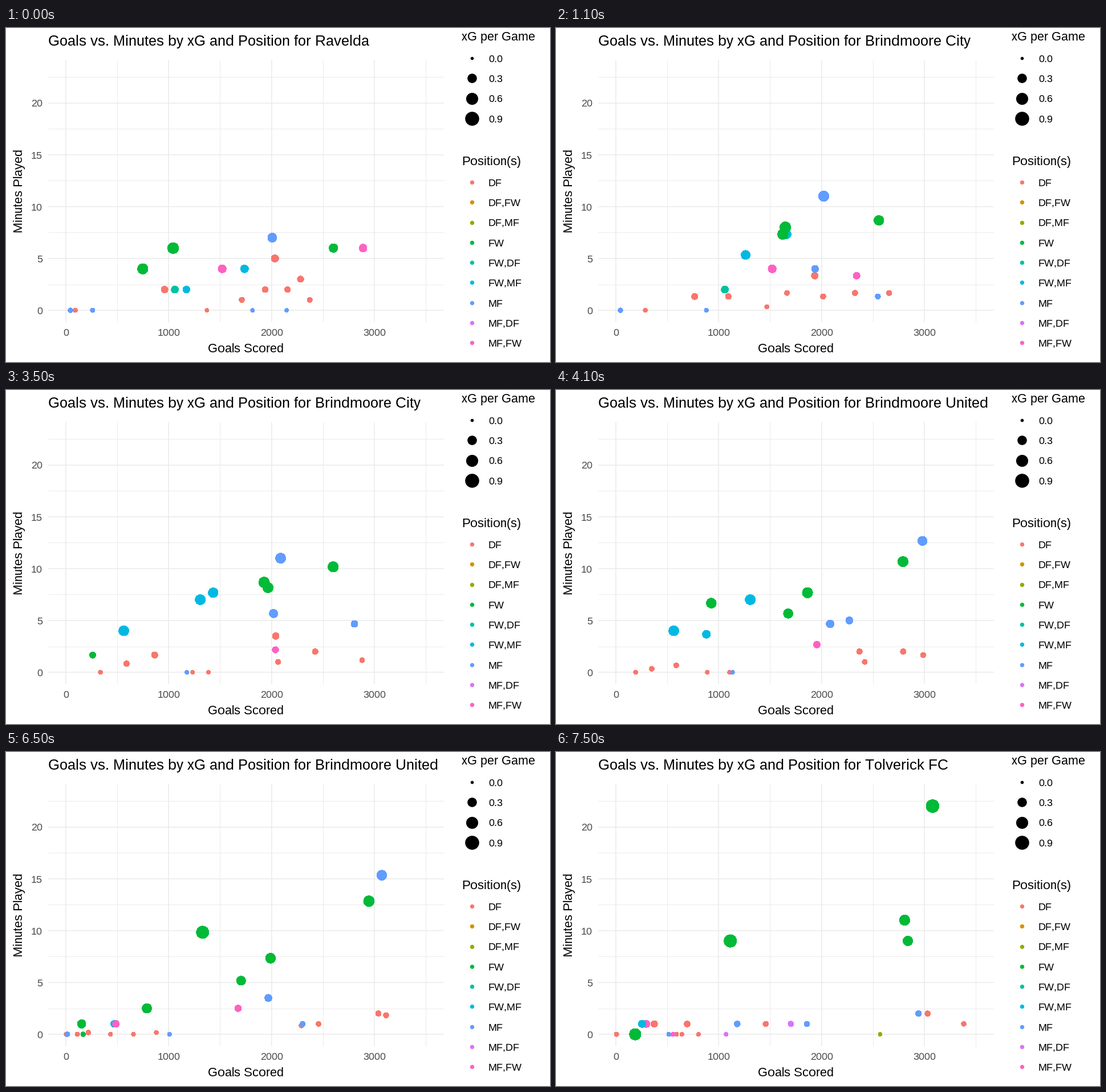
A matplotlib script that plays this animation: 954 px wide and 587 px high, repeating every 8 s.

```python
import matplotlib.pyplot as plt
from matplotlib.animation import FuncAnimation
import numpy as np

W, H, DPI = 954, 587, 64
STEP, LOOP = 100, 8000      # ms
MOVES = (500, 3500, 6500)   # start of each transition
TWEENS, TWEEN_MS = 6, 200

plt.rcParams.update({
    "font.family": "Liberation Sans",
    "text.hinting": "native",
    "text.hinting_factor": 1,
    "text.kerning_factor": 6,
})

COLORS = {
    "DF": "#F8766D", "DF,FW": "#D39200", "DF,MF": "#93AA00",
    "FW": "#00BA38", "FW,DF": "#00C19F", "FW,MF": "#00B9E3",
    "MF": "#619CFF", "MF,DF": "#DB72FB", "MF,FW": "#FF61C3",
}
THREAT = {"FW": 1.3, "DF": 0.75}    # scoring chances by position


def radius(xg):
    return 2.8 + 10 * np.sqrt(xg)


def player(pos, x, goals, chances=0.1):
    """Place of a dot, and its radius from a damped scoring rate."""
    rate = (goals + chances) / (x / 90 + 5)
    return x, goals, radius(rate * THREAT.get(pos, 1))


def run(n, a, b):
    """n players evenly spread from a to b, with whole goals."""
    return [(x, round(g)) for x, g in np.linspace(a, b, n)]


def team(groups):
    return {pos: np.array([player(pos, *p) for p in players])
            for pos, players in groups.items()}


# Two teams' players pair up from the ends of each position's list;
# unpaired leading players enter or leave.
RAVELDA = team({
    "DF": [(91, 0), (960, 2), (1371, 0), (1711, 1), (2033, 5),
           *run(3, (1938, 2), (2372, 1)), (2282, 3)],
    "FW,DF": [(1060, 2)],
    "FW,MF": [(1172, 2), (1737, 4)],
    "FW": [(1043, 6), (748, 4), (2602, 6)],
    "MF": [(44, 0), (260, 0), (1815, 0), (2007, 7), (2147, 0)],
    "MF,FW": [(1520, 4), (2890, 6)],
})
BRIND_CITY = team({
    "DF": [*run(3, (384, 0), (955, 2)), *run(2, (1347, 0), (1480, 0)),
           (1932, 4), (1945, 1), (2302, 2), (2845, 1)],
    "FW,MF": [(563, 4), (1307, 7), (1617, 9)],
    "FW": [(38, 0), (1950, 9), (2062, 9), (2535, 10)],
    "MF": [(1190, 0), (1998, 6), (2028, 13), (2748, 2)],
    "MF,FW": [(2066, 2)],
})
BRIND_UNITED = team({
    "DF": [*run(3, (5, 0), (188, 0)), *run(3, (403, 0), (917, 0)),
           *run(2, (2588, 1), (2657, 1)), *run(2, (3040, 2), (3060, 2))],
    "FW,MF": [(512, 1)],
    "FW": [(153, 1), (168, 0), (908, 3), (1373, 10), (1820, 7), (1483, 4),
           (2920, 11)],
    "MF": [(15, 0), (1107, 0), (2127, 4), (2392, 1), (3098, 18)],
    "MF,FW": [(525, 1), (1898, 3)],
})
TOLVERICK = team({
    "DF": [*run(3, (6, 0), (373, 1)), *run(3, (590, 0), (693, 1)),
           (803, 0), (1457, 1), (3032, 2), (3383, 1)],
    "DF,MF": [(2570, 0)],
    "MF": [(515, 0), (1180, 1), (1857, 1), (2943, 2)],
    "MF,DF": [(1072, 0), (1702, 1)],
    "MF,FW": [(295, 1), (555, 0)],
    "FW,MF": [(255, 1)],
    "FW": [(188, 0, 2.9), (1113, 9), (2840, 9), (2808, 11), (3080, 22)],
})
TEAMS = [("Ravelda", RAVELDA), ("Brindmoore City", BRIND_CITY),
         ("Brindmoore United", BRIND_UNITED), ("Tolverick FC", TOLVERICK)]


def px(v):
    return 105 + v * 0.18033


def py(v):
    return 496.1 - v * 18.23


def area(r):
    return (2 * np.asarray(r) * 72 / DPI) ** 2


fig = plt.figure(figsize=(W / DPI, H / DPI), dpi=DPI, facecolor="white")
ax = fig.add_axes([0, 0, 1, 1])
ax.set_xlim(0, W)
ax.set_ylim(H, 0)
ax.axis("off")


def text(x, y, s, size, color="black", ha="left", **kw):
    return ax.text(x, y, s, fontsize=size * 72 / DPI, color=color, ha=ha,
                   va="baseline", **kw)


def line(xs, ys, width):
    ax.plot(xs, ys, color="#EBEBEB", lw=width * 72 / DPI,
            solid_capstyle="butt", zorder=1)


def dots(x, y, r, color):
    return ax.scatter(x, y, s=area(r), c=color, linewidths=0,
                      antialiased=False, zorder=3)


def draw_grid():
    for width, shift_x, shift_y in ((1, 500, 2.5), (1.5, 0, 0)):
        for v in range(4):
            x = px(1000 * v + shift_x)
            line([x, x], [56, 517], width)
        for v in range(5):
            y = py(5 * v + shift_y)
            line([74, 768], [y, y], width)
    for v in range(0, 4000, 1000):
        text(px(v), 541, str(v), 18, "#4D4D4D", "center")
    for v in range(0, 25, 5):
        text(64, py(v) + 7, str(v), 18, "#4D4D4D", "right")
    text(421, 570, "Goals Scored", 22, ha="center")
    text(28.7, 286, "Minutes Played", 22, ha="center", rotation=90,
         rotation_mode="anchor")


def draw_legends():
    text(799, 22.4, "xG per Game", 22)
    for i in range(4):
        y, xg = 53 + 35.25 * i, 0.3 * i
        dots([817.3], [y], [radius(xg)], "black")
        text(846, y + 7, f"{xg:.1f}", 18)
    text(799, 241, "Position(s)", 22)
    for i, (name, color) in enumerate(COLORS.items()):
        y = 271 + 35.25 * i
        dots([817.2], [y], [3.7], color)
        text(846, y + 7, name, 18)


def pose(start, end, t):
    """Dots and colours a share t of the way between two teams."""
    if t >= 1:
        start, t = end, 0
    rows, colors = [], []
    for pos, players in start.items():
        goal = end.get(pos, players[:0])
        n = min(len(players), len(goal))
        pts = players.copy()
        if n:
            pts[-n:] += t * (goal[-n:] - pts[-n:])
        rows.append(pts)
        colors += [COLORS[pos]] * len(pts)
    return np.vstack(rows), colors


def state(ms):
    """Team index and tween step at a given time."""
    for i in reversed(range(len(MOVES))):
        if ms >= MOVES[i]:
            return i, min((ms - MOVES[i]) // TWEEN_MS + 1, TWEENS)
    return 0, 0


draw_grid()
draw_legends()
title = text(74, 31, "", 26)
cloud = dots([0], [0], [1], "white")


def update(frame):
    i, step = state(frame * STEP)
    pts, colors = pose(TEAMS[i][1], TEAMS[i + 1][1], step / TWEENS)
    cloud.set_offsets(np.column_stack([px(pts[:, 0]), py(pts[:, 1])]))
    cloud.set_sizes(area(pts[:, 2]))
    cloud.set_facecolor(colors)
    name = TEAMS[i + (step > TWEENS // 2)][0]
    title.set_text(f"Goals vs. Minutes by xG and Position for {name}")
    return cloud, title


anim = FuncAnimation(fig, update, frames=LOOP // STEP, interval=STEP,
                     init_func=lambda: update(0), repeat=True, repeat_delay=0)
plt.show()
```
